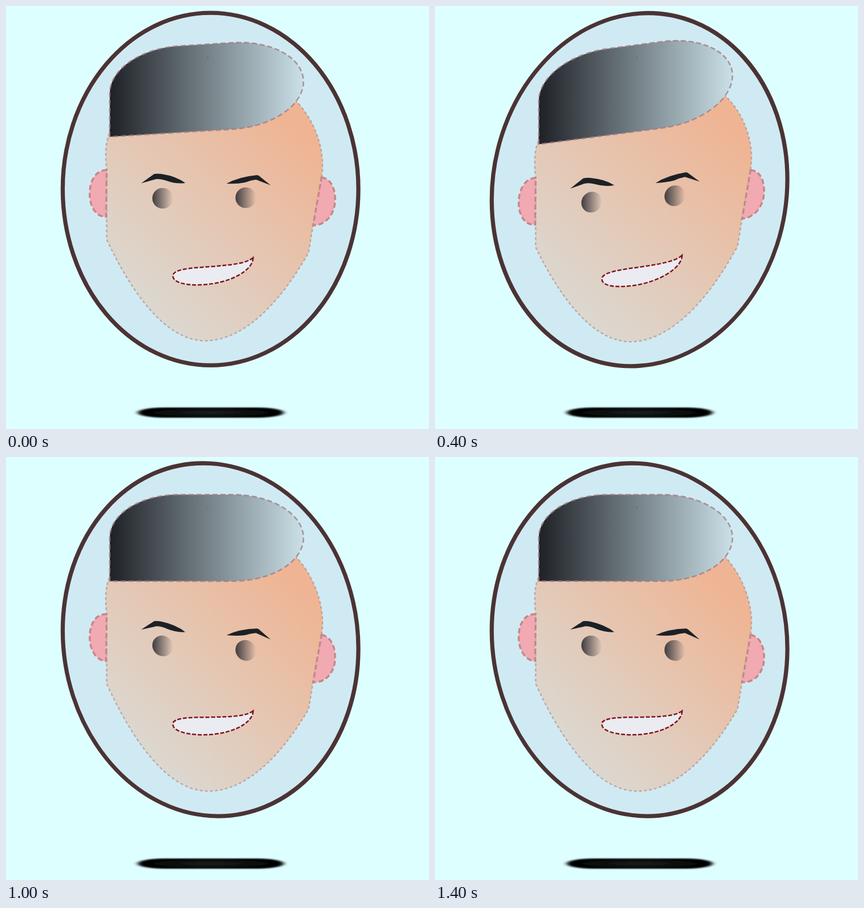
Animation of 748x748 px, one loop 1600 ms. Source, as an HTML page:

```html
<!DOCTYPE html>
<html lang="en">
<head>
<meta charset="utf-8">
<title>Swaying face</title>
<style>
  html, body { margin: 0; width: 100%; height: 100%; overflow: hidden; background: #deffff; }
  svg { display: block; width: 100%; height: 100%; }
</style>
</head>
<body>
<svg viewBox="0 0 748 748">
  <defs>
    <linearGradient id="skin" gradientUnits="userSpaceOnUse" x1="230" y1="520" x2="520" y2="220">
      <stop stop-color="#dbd8d1"/>
      <stop offset="1" stop-color="#efb493"/>
    </linearGradient>
    <linearGradient id="shine">
      <stop stop-color="#1e2126"/>
      <stop offset="1" stop-color="#cae0e7"/>
    </linearGradient>
    <linearGradient id="iris">
      <stop offset=".05" stop-color="#484345"/>
      <stop offset="1" stop-color="#484345" stop-opacity="0"/>
    </linearGradient>
    <radialGradient id="dark">
      <stop stop-color="#1c1f1f"/>
      <stop offset=".8" stop-color="#050606"/>
    </radialGradient>
    <filter id="blur" x="-10%" y="-60%" width="120%" height="220%">
      <feGaussianBlur stdDeviation="4 1.2"/>
    </filter>
  </defs>

  <rect x="233" y="710" width="258" height="18" rx="45" ry="9" fill="url(#dark)" filter="url(#blur)"/>

  <g id="head">
    <ellipse cx="361.7" cy="323.8" rx="261.4" ry="311.6" fill="#d0eaf3" stroke="#4b3334" stroke-width="7.3"/>

    <path d="M183 225C176 240 175 262 178 290L178 413C225 513 285 592 352 592
             C420 592 485 525 535 436L543 388L558 303C564 270 556 215 515 170L400 120L190 150Z"
          fill="url(#skin)" stroke="#b08e88" stroke-opacity=".65" stroke-width="2.5" stroke-dasharray="5 4"/>

    <g fill="#f1a9b2" stroke="#c48789" stroke-width="3.4" stroke-dasharray="9 5">
      <path d="M178 290C158 290 148 310 148 332C148 356 160 373 177 373Z"/>
      <path d="M558 303C573 305 582 320 582 342C582 368 565 388 543 388Z"/>
    </g>

    <path transform="translate(0 22.9) skewY(-3.5)" fill="url(#shine)"
          stroke="#a07a80" stroke-opacity=".75" stroke-width="2.7" stroke-dasharray="9 5"
          d="M183.5 219.5V142A122 76 0 0 1 305.5 66.5H401A125 76.5 0 0 1 401 219.5Z"/>
    <circle cx="357" cy="90" r=".7" fill="#333a40"/>

    <g fill="#1c2126">
      <path d="M239 313.500L262 297Q267 296 275 297Q301 301 317 313Q300 315 284 309Q269 304 262 307Z"/>
      <path d="M390 314Q412 302 444 299L447 300L468 317L442 307Q433 308 423 312Q408 315 390 314Z"/>
    </g>

    <g fill="url(#iris)">
      <circle cx="277" cy="340" r="18.3"/>
      <circle cx="424" cy="339" r="18.3"/>
    </g>

    <path d="M437 445C425 456 395 458 360 461C325 463 295 466 295 477
             C295 490 320 494 345 493C395 491 437 468 437 445Z"
          fill="#ebebf2" stroke="#7f121c" stroke-width="2.5" stroke-dasharray="7 3"/>
  </g>
</svg>
<script>
  const head = document.getElementById("head");
  const LOOP = 1600, STEP = 200, CENTER = 374;

  // Sways linearly 0 → -4° → 0 → 7° → 0, in hard steps.
  function tilt(ms) {
    const p = Math.floor(ms % LOOP / STEP) * STEP / LOOP * 2;
    const swing = 1 - Math.abs(p % 1 * 2 - 1);
    return swing * (p < 1 ? -4 : 7);
  }

  function draw() {
    head.setAttribute("transform",
      `translate(${CENTER} 0) skewY(${tilt(performance.now())}) translate(${-CENTER} 0)`);
    requestAnimationFrame(draw);
  }
  draw();
</script>
</body>
</html>
```
